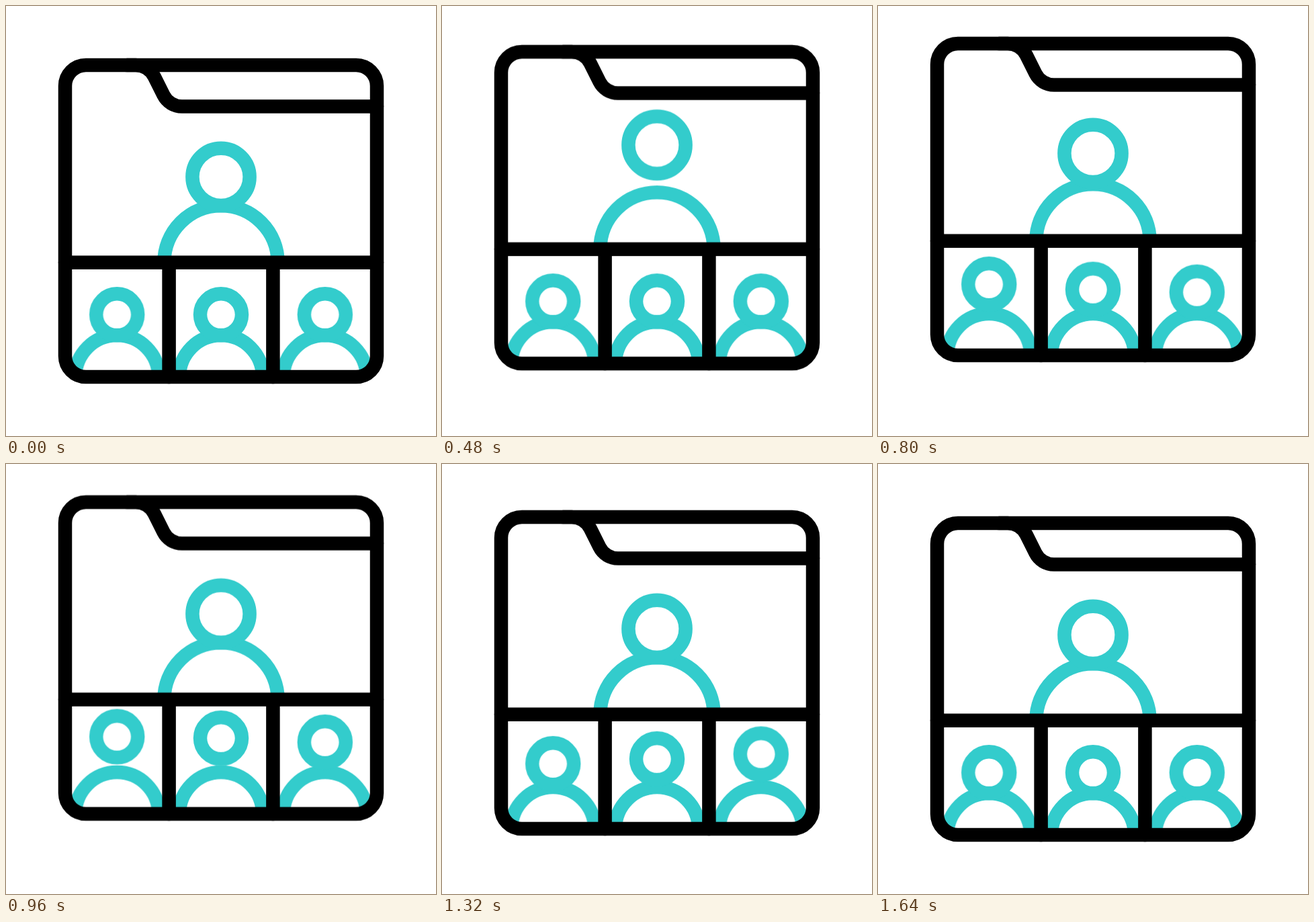
An HTML page without scripts that plays this animation: 640 px wide and 640 px high, repeating every 1.72 s.

```html
<!DOCTYPE html>
<html lang="en">
<head>
<meta charset="utf-8">
<title>Video call window</title>
<style>
  html, body { margin: 0; width: 100%; height: 100%; overflow: hidden; background: #fff; }
  svg { display: block; width: 100%; height: 100%; }

  .window, .head {
    animation: 1720ms cubic-bezier(.57, 0, .43, 1) infinite;
  }
  .window { animation-name: float; }
  .main   { animation-name: nod-main; }
  .left   { animation-name: nod-left; }
  .middle { animation-name: nod-middle; }
  .right  { animation-name: nod-right; }

  .line { fill: none; stroke-width: 20.5; }
  .people { stroke: #3cc; }
  .panes { stroke: #000; stroke-linecap: round; stroke-linejoin: round; }

  @keyframes float {
    0%, 2.33%, 95.35%, 100% { transform: translateY(0); }
    48.84% { transform: translateY(-32.2px); }
  }
  @keyframes nod-main {
    0%, 2.33%, 53.49%, 100% { transform: translateY(0); }
    27.91% { transform: translateY(-27.6px); }
  }
  /* The small heads follow each other 75 ms apart. */
  @keyframes nod-left {
    0%, 32.27%, 85.76%, 100% { transform: translateY(0); }
    59.01% { transform: translateY(-22.5px); }
  }
  @keyframes nod-middle {
    0%, 36.63%, 90.12%, 100% { transform: translateY(0); }
    63.37% { transform: translateY(-22.5px); }
  }
  @keyframes nod-right {
    0%, 41.1%, 94.59%, 100% { transform: translateY(0); }
    67.85% { transform: translateY(-22.5px); }
  }
</style>
</head>
<body>
<svg viewBox="0 0 640 640">
  <defs>
    <path id="shoulders" d="M-62 552a62 62 0 0 1 124 0"/>
    <circle id="face" cy="459.3" r="31"/>
  </defs>
  <g class="window">
    <g class="line people">
      <path d="M235.4 381.7a84.6 84.6 0 0 1 169.2 0"/>
      <circle class="head main" cx="320" cy="254.3" r="42.6"/>
      <g transform="translate(165.2)">
        <use href="#shoulders"/>
        <g class="head left"><use href="#face"/></g>
      </g>
      <g transform="translate(320)">
        <use href="#shoulders"/>
        <g class="head middle"><use href="#face"/></g>
      </g>
      <g transform="translate(474.8)">
        <use href="#shoulders"/>
        <g class="head right"><use href="#face"/></g>
      </g>
    </g>
    <g class="line panes">
      <rect x="88" y="88" width="464" height="464" rx="31"/>
      <path d="M180 88H193C204.7 88 215.4 94.6 220.7 105.1L234.4 132.5C239.6 143 250.3 149.6 262 149.6H552"/>
      <path d="M88 381.8H552M242.6 381.8V552M397.4 381.8V552"/>
    </g>
  </g>
</svg>
</body>
</html>
```
